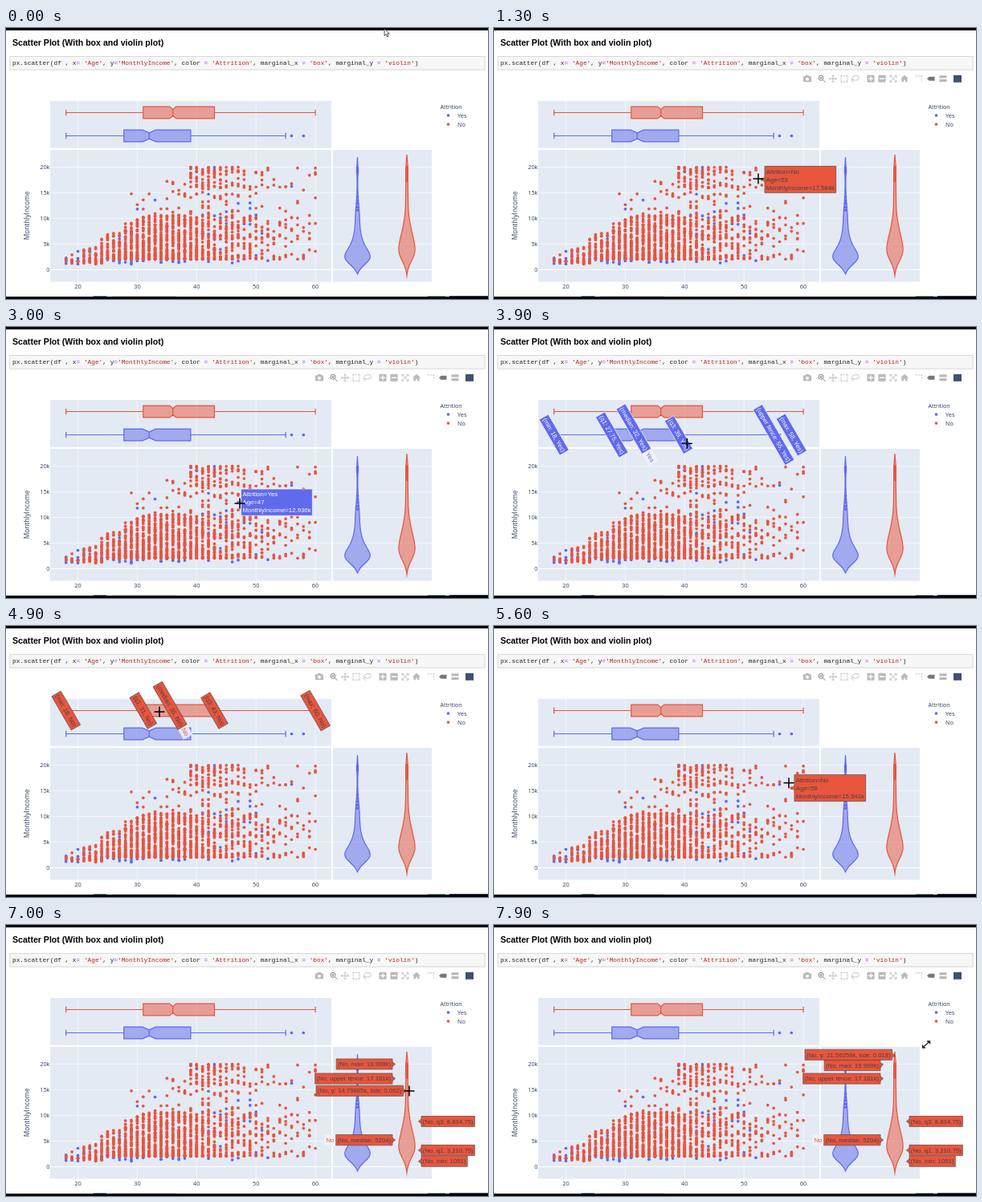
These frames come from a looping animation (600x338 px, 8000 ms). An HTML page with a canvas:

```html
<!DOCTYPE html>
<html lang="en">
<head>
<meta charset="utf-8">
<style>
html, body { margin: 0; width: 100%; height: 100%; overflow: hidden; background: #fff; }
canvas { display: block; }
</style>
</head>
<body>
<canvas id="stage" width="600" height="338"></canvas>
<script>
const ctx = document.getElementById('stage').getContext('2d');
const LOOP = 8000, STEP = 100;
const SANS = '"Open Sans", sans-serif';
const TAG_FONT = '7.8px "Liberation Sans", sans-serif';
const RED = '#e9553d', BLUE = '#606aec', INK = '#2a3f5f', PANEL = '#e3eaf4';
const xOf = age => 89.5 + (age - 20) * 7.39;
const yOf = income => 301.5 - income * 0.0064;
const clamp = (v, lo, hi) => Math.max(lo, Math.min(hi, v));

let seed = 20;
function random() {
  seed = (seed * 1664525 + 1013904223) % 4294967296;
  return seed / 4294967296;
}

// Scatter data: incomes spread out with age; the two named points are hovered later.
const points = [{ age: 53, income: 17584, yes: false }, { age: 47, income: 12936, yes: true }];
const named = points.slice();
for (let age = 18; age <= 60; age++) {
  const spread = age < 34 ? 8.5 : 13;
  const count = Math.round(5 + 72 * Math.exp(-(((age - 34) / spread) ** 2)));
  for (let i = 0; i < count; i++) {
    const yes = random() < (age < 22 ? 0.4 : age < 31 ? 0.15 : 0.06);
    const base = age < 25 || yes ? 1.05 + random() * 0.9 : 2.05;
    const r = random(), u = random();
    let k = base + clamp(0.6 * (age - 17), 0.6, 8.5) * u ** 2.1;
    if (age > 38 && r < 0.17) k = 20 - 4 * u ** 1.4;
    else if (age > 26 && r > 1 - (age - 24) / 85) k = 6 + (age > 28 ? 11.4 : 7) * u ** 1.8;
    const income = Math.round(k * 1000);
    const crowded = named.some(p => Math.abs(p.age - age) < 2 && Math.abs(p.income - income) < 1000);
    if (!crowded) points.push({ age, income, yes });
  }
}

const boxes = [
  { name: 'No', color: RED, y: 105.5, q: [31, 36, 43], notch: 0.54, ends: [18, 60], far: [],
    stats: { min: 18, q1: 31, median: 36, q3: 43, max: 60 } },
  { name: 'Yes', color: BLUE, y: 134.5, q: [27.75, 32, 39], notch: 1.12, ends: [18, 55], far: [56, 58],
    stats: { min: 18, q1: 27.75, median: 32, q3: 39, 'upper fence': 55, max: 58 } }
];

// Each profile entry is [y, half width].
const yesViolin = {
  name: 'Yes', color: BLUE, x: 437.5, scale: 21.8, reach: 15.5, left: [],
  profile: [[161, 0], [170, .5], [178, .9], [188, .4], [200, .4], [214, 1], [226, 2.2], [238, 2.8],
    [251.2, 3.3], [262, 5.5], [270, 8.5], [278, 13.5], [284.5, 16.5], [290, 14.5], [296, 8], [301, 3], [307, 0]],
  far: [19859, 19545, 19246, 18900, 14200, 13500, 12936, 12200, 11600],
  stats: { max: 19859, 'upper fence': 10854, q3: 5935.25, median: 3202, q1: 2371.5, min: 1009 }
};
const noViolin = {
  name: 'No', color: RED, x: 499, scale: 24.2, reach: 15, left: ['max', 'upper fence', 'median', 'y'],
  profile: [[158, 0], [163.5, .44], [172, 1.2], [182, 1.3], [192, 1.2], [206.8, 1.5], [220, 1.6], [232, 2.3],
    [244, 4], [256, 6.6], [266, 9], [275, 10.4], [282, 9.6], [289, 6.5], [296, 3], [303, .8], [309, 0]],
  far: Array.from({ length: 14 }, (_, i) => 19999 - i * 205),
  stats: { max: 19999, 'upper fence': 17181, q3: 8834.75, median: 5204, q1: 3210.75, min: 1051 }
};

// [time, x, y]
const cursorPath = [[0, 471, 1], [500, 455, 80], [900, 395, 160], [1300, 329, 188], [1500, 329, 188],
  [2400, 290, 262], [2800, 288, 235], [2900, 288, 235], [3000, 291, 220], [3300, 291, 220],
  [4200, 215, 108], [4500, 215, 108], [4900, 191, 107], [5200, 191, 107], [5800, 455, 240],
  [5900, 455, 240], [6300, 473, 239], [6600, 500, 238], [7000, 502, 207], [7100, 502, 207],
  [7700, 503, 163], [7900, 538, 149]];
// [time, income under the pointer]
const violinPath = [[5700, 9100], [5800, 8900], [5900, 8900], [6200, 7852.303], [6300, 7852.303],
  [6600, 9920], [7000, 14798.85], [7100, 14798.85], [7700, 21562.58]];

function along(path, t, field = 1) {
  const i = path.findIndex(key => key[0] >= t);
  if (i < 0) return path[path.length - 1][field];
  if (i === 0) return path[0][field];
  const a = path[i - 1], b = path[i];
  return a[field] + (b[field] - a[field]) * (t - a[0]) / (b[0] - a[0]);
}

function rect(x, y, w, h, color) {
  ctx.fillStyle = color;
  ctx.fillRect(x, y, w, h);
}

function line(x1, y1, x2, y2, color, width = 1) {
  ctx.strokeStyle = color;
  ctx.lineWidth = width;
  ctx.beginPath();
  ctx.moveTo(x1, y1);
  ctx.lineTo(x2, y2);
  ctx.stroke();
}

function dot(x, y, color, radius = 1.85) {
  ctx.fillStyle = color;
  ctx.beginPath();
  ctx.arc(x, y, radius, 0, 7);
  ctx.fill();
}

function text(str, x, y, { font = '7.4px ' + SANS, color = INK, align = 'left' } = {}) {
  ctx.font = font;
  ctx.fillStyle = color;
  ctx.textAlign = align;
  ctx.textBaseline = 'alphabetic';
  ctx.fillText(str, x, y);
}

function tagWidth(str) {
  ctx.font = TAG_FONT;
  return ctx.measureText(str).width;
}

function fillHalf(color) {
  ctx.fillStyle = color + '80';
  ctx.fill();
  ctx.strokeStyle = color;
  ctx.lineWidth = 1.2;
  ctx.stroke();
}

function drawNotebook() {
  rect(0, 0, 600, 338, '#fff');
  rect(0, 0, 600, 3, '#000');
  rect(132, 334, 80, 1, '#ddd');
  rect(109, 334, 16, 1, '#5f8a92');
  rect(525, 334, 22, 1, '#7da394');
  rect(552, 334, 48, 1, '#3c4660');
  rect(0, 335, 600, 3, '#000');
  text('Scatter Plot (With box and violin plot)', 8, 21.5,
    { font: 'bold 10.6px "Liberation Sans", sans-serif', color: '#000' });
  rect(4.5, 35, 592, 17.5, '#cfcfcf');
  rect(5.3, 35.8, 590.4, 15.9, '#f7f7f7');
  const code = "px.scatter(df , x= 'Age', y='MonthlyIncome', color = 'Attrition', marginal_x = 'box', marginal_y = 'violin')";
  let x = 8;
  for (const token of code.match(/'[^']*'|=|[^'=]+/g)) {
    const color = token[0] === "'" ? '#ba2121' : token === '=' ? '#aa22ff' : '#222';
    text(token, x, 46, { font: '7.8px "Liberation Mono", monospace', color });
    x += ctx.measureText(token).width;
  }
}

function drawAxes() {
  rect(55, 91, 350, 58.8, PANEL);
  rect(55, 152, 350, 164.5, PANEL);
  rect(407, 152, 123, 164.5, PANEL);
  for (let age = 20; age <= 60; age += 10) {
    const x = xOf(age);
    line(x, 91, x, 149.8, '#fff', 0.6);
    line(x, 152, x, 316.5, '#fff', 0.6);
    text(age, x, 325, { align: 'center' });
  }
  for (let k = 0; k <= 20; k += 5) {
    const y = yOf(k * 1000), width = k ? 0.6 : 1.2;
    line(55, y, 405, y, '#fff', width);
    line(407, y, 530, y, '#fff', width);
    text(k ? k + 'k' : '0', 54.5, y + 2.8, { align: 'right' });
  }
  ctx.save();
  ctx.translate(29, 234);
  ctx.rotate(-Math.PI / 2);
  text('MonthlyIncome', 0, 0, { font: '8.3px ' + SANS, align: 'center' });
  ctx.restore();
  text('Attrition', 540.5, 100.5, { font: '7.1px ' + SANS });
  dot(550.5, 109, BLUE);
  text('Yes', 562, 111.8);
  dot(550.5, 120, RED);
  text('No', 562, 122.8);
}

function drawBox({ color, y, q, notch, ends, far }) {
  const [q1, mid, q3] = q.map(xOf), n = notch * 7.39, h = 7.4;
  const [lo, hi] = ends.map(xOf);
  line(lo, y, q1, y, color, 1.2);
  line(q3, y, hi, y, color, 1.2);
  for (const x of [lo, hi]) line(x, y - 3.7, x, y + 3.7, color, 1.2);
  ctx.beginPath();
  [[q1, -h], [mid - n, -h], [mid, -h / 2], [mid + n, -h], [q3, -h],
    [q3, h], [mid + n, h], [mid, h / 2], [mid - n, h], [q1, h]].forEach(([x, dy]) => ctx.lineTo(x, y + dy));
  ctx.closePath();
  fillHalf(color);
  line(mid, y - h / 2, mid, y + h / 2, color, 1.2);
  far.forEach(age => dot(xOf(age), y, color));
}

function drawViolin({ x, color, profile, far }) {
  const outline = [...profile.map(([y, w]) => [x + w, y]), ...profile.slice().reverse().map(([y, w]) => [x - w, y])];
  ctx.beginPath();
  ctx.moveTo(...outline[0]);
  outline.forEach((p, i) => {
    const next = outline[(i + 1) % outline.length];
    ctx.quadraticCurveTo(...p, (p[0] + next[0]) / 2, (p[1] + next[1]) / 2);
  });
  ctx.closePath();
  fillHalf(color);
  far.forEach(income => dot(x, yOf(income), color, 1.7));
}

// Hover label anchored at (x, y); side is 1 for right, -1 for left, 0 for centred.
function drawTag(x, y, lines, color, { side = 1, arrowY = y, name = '' } = {}) {
  const w = Math.max(...lines.map(tagWidth)) + 3.6, h = lines.length * 10 + 3.2;
  const nameW = name ? tagWidth(name) + 4.5 : 0;
  const ink = color === RED ? '#444' : '#fff';
  const gap = 3.6;
  const left = side > 0 ? x + gap : side < 0 ? x - gap - w : x - (w + nameW) / 2;
  const top = y - h / 2;
  if (name) {
    const nx = side < 0 ? left - nameW : left + w;
    rect(nx, top, nameW, h, 'rgba(240,243,250,.85)');
    text(name, nx + nameW / 2, y + 2.7, { font: TAG_FONT, color, align: 'center' });
  }
  ctx.beginPath();
  ctx.rect(left, top, w, h);
  ctx.fillStyle = color;
  ctx.strokeStyle = ink;
  ctx.lineWidth = 0.6;
  ctx.fill();
  ctx.stroke();
  if (side) {
    const edge = x + gap * side, tip = clamp(arrowY, top, top + h);
    ctx.beginPath();
    ctx.moveTo(edge, y - 3);
    ctx.lineTo(x, tip);
    ctx.lineTo(edge, y + 3);
    ctx.fillStyle = color;
    ctx.fill();
    ctx.stroke();
  }
  lines.forEach((str, i) => text(str, left + 1.8, top + 9.3 + i * 10, { font: TAG_FONT, color: ink }));
}

function format(v) {
  if (v >= 10000) return +(v / 1000).toFixed(5) + 'k';
  return Number.isInteger(v) ? String(v) : v.toLocaleString('en-US', { maximumFractionDigits: 3 });
}

function hoverScatter(cx, cy) {
  let best = null, reach = 12;
  for (const p of points) {
    const d = Math.hypot(xOf(p.age) - cx, yOf(p.income) - cy);
    if (d < reach) [best, reach] = [p, d];
  }
  if (!best) return;
  drawTag(xOf(best.age), yOf(best.income),
    ['Attrition=' + (best.yes ? 'Yes' : 'No'), 'Age=' + best.age, 'MonthlyIncome=' + format(best.income)],
    best.yes ? BLUE : RED);
}

function hoverBox({ name, color, y, stats }) {
  for (const [key, age] of Object.entries(stats)) {
    ctx.save();
    ctx.translate(xOf(age), y);
    ctx.rotate(Math.PI / 3);
    drawTag(0, 0, [`(${key}: ${age}, ${name})`], color, { side: 0, name: key === 'median' ? name : '' });
    ctx.restore();
  }
}

// Push overlapping labels apart symmetrically.
function separate(tags) {
  tags.sort((a, b) => a.y - b.y);
  for (let pass = 0; pass < 80; pass++) {
    for (let i = 1; i < tags.length; i++) {
      const overlap = 13.4 - (tags[i].y - tags[i - 1].y);
      if (overlap > 0) {
        tags[i].y += overlap / 2;
        tags[i - 1].y -= overlap / 2;
      }
    }
  }
}

function hoverViolin({ name, color, x, scale, reach, left, profile, stats }, income) {
  const level = yOf(income), half = along(profile, level);
  line(x - half, level, x + half, level, color);
  const tags = Object.entries({ ...stats, y: income }).map(([key, v]) => {
    const side = left.includes(key) ? -1 : 1;
    const kde = key === 'y' ? ', kde: ' + (half / scale).toFixed(3) : '';
    return { side, key, y: yOf(v), arrowY: yOf(v), x: x + side * (kde ? half : reach) - side * 0.6,
      label: `(${name}, ${key}: ${format(v)}${kde})` };
  });
  for (const side of [-1, 1]) separate(tags.filter(tag => tag.side === side));
  for (const { key, label, x, y, side, arrowY } of tags) {
    drawTag(x, y, [label], color, { side, arrowY, name: key === 'median' ? name : '' });
  }
}

const GREY = '#b9b9b9', DARK = '#777';
const icons = [
  [390, 'M-5-3h2.5l1-1.5h3l1 1.5h2.5v7h-10z M-2 .5a2 2 0 1 0 4 0a2 2 0 1 0-4 0z', GREY, true],
  [408, 'M-4-1a3 3 0 1 0 6 0a3 3 0 1 0-6 0 M1.5 1.5L4.5 4.5 M-2.5-1h3 M-1-2.5v3', DARK],
  [422, 'M-4.5 0h9 M0-4.5v9 M-3-1.5L-4.5 0L-3 1.5 M3-1.5L4.5 0L3 1.5 M-1.5-3L0-4.5L1.5-3 M-1.5 3L0 4.5L1.5 3', GREY],
  [436, 'M-4-4h2m1 0h2m1 0h2v2m0 1v2m0 1v2h-2m-1 0h-2m-1 0h-2v-2m0-1v-2m0-1v-2', GREY],
  [450, 'M-3 2C-7-2 0-5 3-3.5S4 3-2 1.5S-3 4-2 4.5', GREY],
  [469, 'M-4.5-4.5h9v9h-9z M-.7-3v2.3h-2.3v1.4h2.3v2.3h1.4v-2.3h2.3v-1.4h-2.3v-2.3z', GREY, true],
  [483, 'M-4.5-4.5h9v9h-9z M-3-.7v1.4h6v-1.4z', GREY, true],
  [497, 'M-4-1.5v-2.5h2.5 M4-1.5v-2.5h-2.5 M-4 1.5v2.5h2.5 M4 1.5v2.5h-2.5 M-3.5-3.5l7 7 M3.5-3.5l-7 7', GREY],
  [511, 'M-5 0L0-4.5L5 0h-1.5v4h-2.5v-2.5h-2v2.5h-2.5v-4z', GREY, true],
  [529, 'M-4-3.5h2m1 0h2m1 0h1.5v1.5m0 1.5v1.5m0 1.5v1', GREY],
  [544, 'M-5 0l2.5-2.5h7v5h-7z', DARK, true],
  [559, 'M-4.5-4h9v3.3h-9z M-4.5.7h9v3.3h-9z', GREY, true],
  [577, 'M-5-4.5h10v9h-10z', '#3f4f75', true]
];

function drawToolbar(alpha) {
  ctx.globalAlpha = alpha;
  for (const [x, d, color, solid] of icons) {
    const path = new Path2D(d);
    ctx.save();
    ctx.translate(x, 63.3);
    ctx.fillStyle = ctx.strokeStyle = color;
    ctx.lineWidth = 0.9;
    if (solid) ctx.fill(path, 'evenodd');
    else ctx.stroke(path);
    ctx.restore();
  }
  ctx.globalAlpha = 1;
}

function drawCursor(x, y, overPlot, t) {
  if (overPlot) {
    line(x - 6.5, y, x + 6.5, y, '#000', 1.5);
    line(x, y - 6.5, x, y + 6.5, '#000', 1.5);
    return;
  }
  const resizing = t >= 7800;
  const path = new Path2D(resizing
    ? 'M-4.5 4L4.5-4 M1-4h3.5v3.5 M-1 4h-3.5v-3.5'
    : 'M0 0v8.5l2-1.8l1.4 3.2l1.6-.7l-1.4-3.1h2.6z');
  ctx.save();
  ctx.translate(x, y);
  ctx.strokeStyle = '#222';
  ctx.lineWidth = resizing ? 1.3 : 0.8;
  ctx.fillStyle = '#fff';
  if (!resizing) ctx.fill(path);
  ctx.stroke(path);
  ctx.restore();
}

function draw(t) {
  const cx = along(cursorPath, t, 1), cy = along(cursorPath, t, 2);
  const inMain = cx > 55 && cx < 405;
  const overBoxes = inMain && cy > 91 && cy < 150;
  const overScatter = inMain && cy > 152 && cy < 316;
  const overViolins = cx > 407 && cx < 530 && cy > 152 && cy < 316;

  drawNotebook();
  drawAxes();
  for (const yes of [true, false]) {
    for (const p of points) if (p.yes === yes) dot(xOf(p.age), yOf(p.income), yes ? BLUE : RED);
  }
  boxes.forEach(drawBox);
  drawViolin(yesViolin);
  drawViolin(noViolin);
  drawToolbar(clamp((t - 400) / 300, 0, 1));

  if (overScatter) hoverScatter(cx, cy);
  if (overBoxes) boxes.filter(box => Math.abs(cy - box.y) < 14).forEach(hoverBox);
  if (t >= 5700) hoverViolin(t < 6500 ? yesViolin : noViolin, along(violinPath, t));
  drawCursor(cx, cy, overBoxes || overScatter || overViolins, t);
}

let shown = -1;
const start = performance.now();
function tick() {
  const t = Math.floor(((performance.now() - start) % LOOP) / STEP) * STEP;
  if (t !== shown) draw(shown = t);
  requestAnimationFrame(tick);
}
tick();
</script>
</body>
</html>
```
